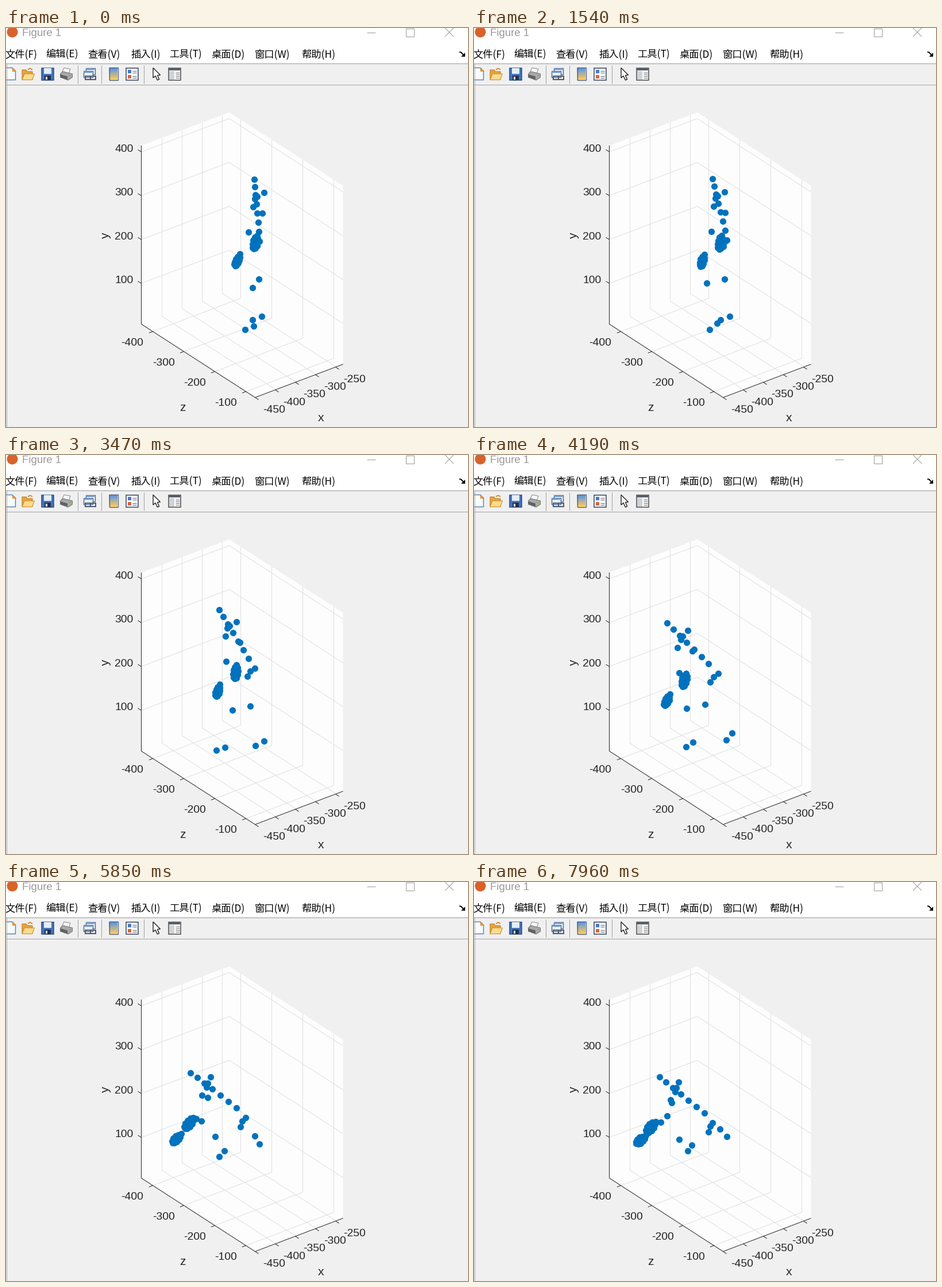
These frames come from a looping animation (804x696 px, 8 s). A matplotlib script:

```python
import matplotlib.pyplot as plt
import numpy as np
from matplotlib.animation import FuncAnimation
from matplotlib.patches import Circle, Polygon, Rectangle

W, H, DPI = 804, 696, 96
PX = 72 / DPI            # points per pixel
STEP, FRAMES = 50, 160   # 8 s loop
BLUE, INK, GRID = "#0072bd", "#262626", "#dfdfdf"

fig = plt.figure(figsize=(W / DPI, H / DPI), dpi=DPI, facecolor="#f0f0f0")
ax = fig.add_axes([0, 0, 1, 1])
ax.set_xlim(0, W)
ax.set_ylim(H, 0)
ax.axis("off")


def rect(x, y, w, h, fc, ec="none", lw=1.0):
    ax.add_patch(Rectangle((x, y), w, h, fc=fc, ec=ec, lw=lw * PX))


def poly(pts, fc, ec="none", lw=1.0):
    ax.add_patch(Polygon(pts, closed=True, fc=fc, ec=ec, lw=lw * PX))


def line(pts, color, lw=1.0):
    x, y = zip(*pts)
    ax.plot(x, y, color=color, lw=lw * PX, solid_capstyle="butt")


def text(x, y, s, size, color=INK, font="Liberation Sans", **kw):
    kw = {"ha": "center", "va": "center", **kw}
    ax.text(x, y, s, fontsize=size * PX, color=color, family=font, **kw)


# ---- window chrome ----

def title_bar():
    rect(0, 0, W, 61, "white")
    ax.add_patch(Circle((11, 7), 9.5, fc="#d9622b", ec="none"))
    text(28, 13.5, "Figure 1", 18.6, "#999999", ha="left", va="baseline")
    gray = "#999999"
    line([(628, 7.5), (643, 7.5)], gray)
    rect(695.5, 0.5, 14, 14, "none", gray)
    line([(764, 0), (779, 15)], gray)
    line([(764, 15), (779, 0)], gray)


def menu_bar():
    menus = {-2: "文件(F)", 69: "编辑(E)", 142: "查看(V)", 217: "插入(I)",
             284: "工具(T)", 357: "桌面(D)", 433: "窗口(W)", 514: "帮助(H)"}
    for x, name in menus.items():
        text(x, 46.5, name, 17.3, "black", "Noto Sans CJK JP", ha="left")
    line([(789, 42), (792, 42.5), (796, 47)], "black", 2)
    poly([(798.5, 42.5), (798.5, 49.5), (791.5, 49.5)], "black")


def page_icon():
    poly([(-3, 69.5), (11, 69.5), (16.5, 75), (16.5, 90.5), (-3, 90.5)],
         "#f7fbff", "#5b86b5", 1.5)
    poly([(11, 69.5), (11, 75), (16.5, 75)], "#f2a23a", "#d9862a")


def folder_icon():
    poly([(28, 90), (28, 73), (35, 73), (37, 76), (46, 76), (46, 90)],
         "#e9a33b", "#b8792a")
    poly([(28, 90.5), (32, 80), (49.5, 80), (45.5, 90.5)], "#fbdc8b", "#c8862f")
    line([(38, 72.5), (42, 70.5), (46, 72.5)], "#d98c2e", 2)


def floppy_icon():
    rect(61.5, 69.5, 21, 21, "#4473b8", "#2b4f8c", 1.5)
    rect(66, 70, 13, 10, "#e4edf8")
    rect(67, 83, 11, 7.5, "#22304a")
    rect(69, 84.5, 3, 5, "#dfe6ee")


def printer_icon():
    poly([(101, 69.5), (112, 71.5), (109, 80), (97, 78)], "#f6f6f6", "#8a8a8a")
    poly([(94.5, 80), (99, 76), (115.5, 80), (115.5, 86), (108, 91), (94.5, 86)],
         "#a9a9a9", "#6e6e6e")
    poly([(95, 81), (107, 84.5), (107, 90), (95, 86)], "#5f6266")
    rect(110, 82, 3, 2, "#7fb14a")


def link_icon():
    for x, y in ((138.5, 69.5), (134.5, 74.5)):
        rect(x, y, 16, 11, "#e6effa", "#4c6585", 1.4)
        rect(x + 0.5, y + 0.5, 15, 2.5, "#6d93c4")
    for x in (138, 147):
        rect(x, 84, 9, 5.5, "none", "#4a5b70", 2)


def colorbar_icon():
    top, low = np.array([0.36, 0.58, 0.88]), np.array([1.0, 0.80, 0.36])
    for i in range(8):
        rect(179, 69 + i * 2.75, 15, 3, tuple(top + (low - top) * i / 7))
    rect(179.5, 68.5, 15, 22, "none", "#51658a", 1.4)


def legend_icon():
    rect(208.5, 69.5, 21, 21, "#f8fafc", "#404f68", 1.6)
    rect(212, 73, 6, 6, "#4a78c4")
    rect(212, 82, 6, 6, "#d8643c")
    for y in (74, 77, 83, 86):
        line([(220, y + 0.5), (227, y + 0.5)], "#59677c")


def pointer_icon():
    poly([(256, 69.5), (256, 87), (260, 83.5), (263.5, 91), (266.5, 89.5),
          (263.5, 82.5), (268.5, 82)], "white", "#222222", 1.4)


def panel_icon():
    rect(282.5, 69.5, 21, 21, "white", "#4a4a4a", 1.5)
    rect(283, 70, 20, 4, "#57606c")
    rect(284, 75, 9, 15, "#cfd3d8")
    for y in range(77, 90, 3):
        line([(295, y + 0.5), (302, y + 0.5)], "#666666")


def toolbar():
    for y in (61.5, 98.5):
        line([(0, y), (W, y)], "#a0a0a0")
    for x in (124.5, 165.5, 239.5):
        line([(x, 65), (x, 97)], "#a0a0a0")
    for icon in (page_icon, folder_icon, floppy_icon, printer_icon, link_icon,
                 colorbar_icon, legend_icon, pointer_icon, panel_icon):
        icon()
    line([(0.5, 61), (0.5, H)], "#a8a8a8")
    line([(0, H - 0.5), (W, H - 0.5)], "#c4c4c4")


# ---- 3D box, drawn in its fixed projection ----

LEFT, BACK = np.array([235.5, 516.5]), np.array([388.5, 458.5])
RIGHT, FRONT = np.array([586.5, 586.5]), np.array([433.5, 644.5])
UP = np.array([0, -311.5])


def box():
    poly([LEFT, LEFT + UP, BACK + UP, RIGHT + UP, RIGHT, FRONT], "#fdfdfd")
    to_back, to_right = BACK - LEFT, RIGHT - BACK
    for i in range(4):
        lift = np.array([0, -71 - 76.5 * i])
        line([LEFT + lift, BACK + lift, RIGHT + lift], GRID)
        p = LEFT + to_back * (35 * (i + 1) + 1) / 153
        line([p + UP, p, p + to_right], GRID)
        p = BACK + to_right * (20 + 54 * i) / 198
        line([p + UP, p, p - to_back], GRID)
    line([LEFT + UP, LEFT, FRONT, RIGHT], INK)

    for i in range(4):
        p = LEFT + (0, -71 - 76.5 * i)
        line([p, p + (-6, -3.7)], INK)
        text(221.5, 440.5 - 76.4 * i, str(100 * (i + 1)), 19.2, ha="right")
        p = LEFT + to_right * (20 + 54 * i) / 198
        line([p, p + (-6.6, 2.5)], INK)
        text(p[0] - 35.5, p[1] + 20, str(100 * i - 400), 19.2)
    for i in range(5):
        p = FRONT + to_back * 35 * i / 153
        line([p, p + (6, 3.9)], INK)
        text(p[0] + 33.5, p[1] + 22, str(50 * i - 450), 19.2)
    text(173, 362, "y", 21, rotation=90)
    text(307.5, 662, "z", 21)
    text(548, 680, "x", 21)


# ---- moving body: a small skeleton driven by a few eased phases ----

def ramp(t, start, end):
    s = np.clip((t - start) / (end - start), 0, 1)
    return s * s * (3 - 2 * s)


def phases(t):
    return dict(
        drift=min(t / 2490, 1),                                # slow lean
        glide=ramp(t, 2400, 4900),                             # sideways bend
        drop=ramp(t, 3100, 5100),                              # sinking
        settle=1 - (1 - np.clip((t - 4900) / 2500, 0, 1)) ** 2.5,
        knee=ramp(t, 100, 1500),                               # left knee first,
        stride=ramp(t, 1560, 2450),                            # then the foot
    )


def hand(elbow, angle, reach, length, width):
    """Wrist and a blob of finger joints along the forearm."""
    along = np.array([-np.sin(angle), np.cos(angle)])
    across = np.array([along[1], -along[0]])
    centre = elbow + reach * along
    a = np.arange(10) * np.pi / 5
    u, v = length * np.cos(a), width * np.sin(a)
    fingers = centre + np.outer(u, along) + np.outer(v, across)
    return [centre - 13 * along, centre, *fingers]


def body(t):
    m = phases(t)
    drift, glide, drop, settle = (m[k] for k in ("drift", "glide", "drop", "settle"))

    def move(x, y, **by):
        return np.array([x, y]) + sum(m[k] * np.array(d) for k, d in by.items())

    pelvis = move(440, 355, drift=(-5, -3), glide=(-34, 6), drop=(0, 14), settle=(0, 31))
    head = move(432, 264, drift=(-29, -1), glide=(-85, 8), drop=(0, 45), settle=(5, 24))
    s = np.linspace(0, 1, 7)
    spine = pelvis + np.outer(s * (1.07 - 0.07 * s ** 3), head - pelvis)
    chest = spine[4]
    blades = [chest + (3 + 3 * drop, 3 - 3 * drop), chest + (5 * drop - 1, 7)]

    shoulder_r = chest + (15 - 2 * drop - 3 * settle, -4 - 8 * drop + 2 * settle)
    shoulder_l = chest + (-4, 21)
    swing = 6 * drift + 7 * glide - 22 * settle
    elbow_r = shoulder_r + (swing - 3, 36)
    elbow_l = shoulder_l + (swing - 8, 44 - 5 * settle)
    bend = np.radians(14 - 8 * drift + 19 * drop + 16 * settle)
    arms = [shoulder_r, shoulder_l, elbow_r, elbow_l,
            *hand(elbow_r, bend, 53 + 4 * settle, 11, 4.5 + settle),
            *hand(elbow_l, bend + 0.14, 54 - 6 * settle, 9, 3.7 + settle)]

    hip_r = pelvis + (1 + 4 * drift + 15 * glide - 6 * settle, 17)
    hip_l = pelvis + (10 * drop - 3, 25 + 4 * drift + 4 * glide)
    legs = [
        hip_r, hip_l, (hip_r + hip_l) / 2 - (1, 2),
        move(440, 438, drift=(-6, 0), glide=(-15, 0), drop=(-38, -6), settle=(-24, 17)),
        move(429, 453, knee=(-24, -8), glide=(-23, 0), drop=(-32, -6), settle=(-14, -31)),
        move(445, 503, glide=(15, -5), drop=(-15, -27), settle=(-17, -40)),
        move(429, 509, glide=(13, 0), drop=(0, -23), settle=(-2, -42)),
        move(431, 520, knee=(-8, -5), stride=(-42, -3), drop=(0, -20), settle=(-2, -33)),
        move(416, 526, knee=(-6, 0), stride=(-46, -10), glide=(6, 0), drop=(0, -13),
             settle=(2, -34)),
    ]
    return np.vstack([spine, blades, arms, legs])


title_bar()
menu_bar()
toolbar()
box()
dots = ax.scatter([0], [0], s=(11.2 * PX) ** 2, color=BLUE, linewidths=0, zorder=5)


def update(i):
    dots.set_offsets(body(i * STEP))
    return dots,


anim = FuncAnimation(fig, update, frames=FRAMES, interval=STEP,
                     init_func=lambda: update(0), repeat=True)
plt.show()
```
